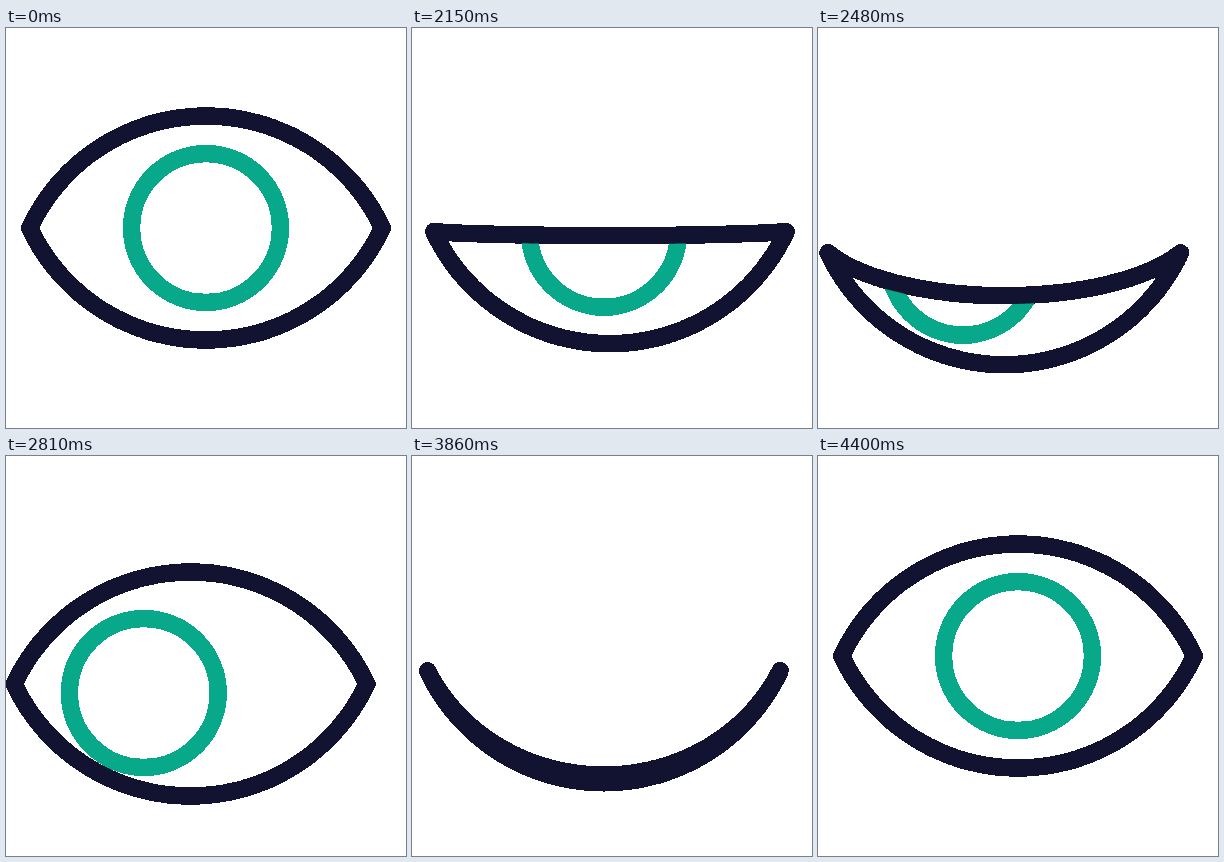
These frames come from a looping animation (400 px wide and 400 px high, 4430 ms). An HTML page with a canvas:

```html
<!DOCTYPE html>
<html lang="en">
<head>
<meta charset="utf-8">
<title>Blinking eye</title>
<style>
  html, body { margin: 0; width: 100%; height: 100%; overflow: hidden; background: #fff; }
  canvas { display: block; width: 400px; height: 400px; }
</style>
</head>
<body>
<canvas id="stage" width="400" height="400"></canvas>
<script>
const SIZE = 400;
const ctx = document.getElementById('stage').getContext('2d', { willReadFrequently: true });

const LOOP = 4430, STEP = 30, PHASE = 20;
const BLINK = 800, CLOSE = 292;       // ms: whole blink, closing part
const LOOK = 2000.5, RETURN = 3600.5; // ms: blink starts
const INK = '#121331', GREEN = '#08a88a';
const HALF = 176.3, RISE = 112;       // lid half width and height
const RADIUS = (HALF * HALF + RISE * RISE) / (2 * RISE);
const LINE = 16.74;
const EDGE = 32;                      // alpha above which a pixel is solid

const clamp = v => Math.min(1, Math.max(0, v));
const mix = (a, b, p) => a + (b - a) * p;
const smooth = v => { v = clamp(v); return v * v * (3 - 2 * v); };

// Bezier easing with handles (0.38, 0) and (0.18, 1)
function glide(x) {
  if (x <= 0 || x >= 1) return clamp(x);
  let lo = 0, hi = 1;
  for (let i = 0; i < 30; i++) {
    const s = (lo + hi) / 2, r = 1 - s;
    const bx = 3 * r * r * s * 0.38 + 3 * r * s * s * 0.18 + s * s * s;
    if (bx < x) lo = s; else hi = s;
  }
  return smooth(lo);
}

// 0 = lid open, 1 = lid closed
function lidAt(ms) {
  return ms < CLOSE ? smooth(ms / CLOSE) : 1 - smooth((ms - CLOSE) / (BLINK - CLOSE));
}

const arch = x => Math.sqrt(RADIUS * RADIUS - x * x) - (RADIUS - RISE);

// Both lids as one closed path; bend is -1 for a raised upper lid, 1 for a lowered one
function eyePath(cx, cy, bend) {
  const p = new Path2D(), n = 180;
  const at = i => HALF * (2 * i / n - 1);
  p.moveTo(cx - HALF, cy);
  for (let i = 1; i <= n; i++) p.lineTo(cx + at(i), cy + bend * arch(at(i)));
  for (let i = n - 1; i > 0; i--) p.lineTo(cx + at(i), cy + arch(at(i)));
  p.closePath();
  return p;
}

// Hard, aliased outlines
function harden() {
  const img = ctx.getImageData(0, 0, SIZE, SIZE), d = img.data;
  for (let i = 3; i < d.length; i += 4) d[i] = d[i] > EDGE ? 255 : 0;
  ctx.putImageData(img, 0, 0);
}

function draw(t) {
  const shift = glide((t - LOOK) / BLINK) - glide((t - RETURN) / BLINK);
  const lid = lidAt(t - (t < RETURN ? LOOK : RETURN));
  const eye = eyePath(mix(200, 184.5, shift), mix(200, 228, shift), mix(-1, 1, lid));

  ctx.clearRect(0, 0, SIZE, SIZE);
  ctx.lineWidth = LINE;

  ctx.save();
  ctx.clip(eye);
  ctx.strokeStyle = GREEN;
  ctx.beginPath();
  ctx.arc(mix(200, 137.8, shift), mix(200, 237, shift), 74.4, 0, Math.PI * 2);
  ctx.stroke();
  ctx.restore();

  ctx.strokeStyle = INK;
  ctx.lineJoin = shift > 0.9 ? 'miter' : 'round';
  ctx.stroke(eye);
  harden();
}

const start = performance.now();
function frame() {
  const t = (performance.now() - start) % LOOP;
  draw(Math.floor((t - PHASE) / STEP) * STEP + PHASE);
  requestAnimationFrame(frame);
}
frame();
</script>
</body>
</html>
```
